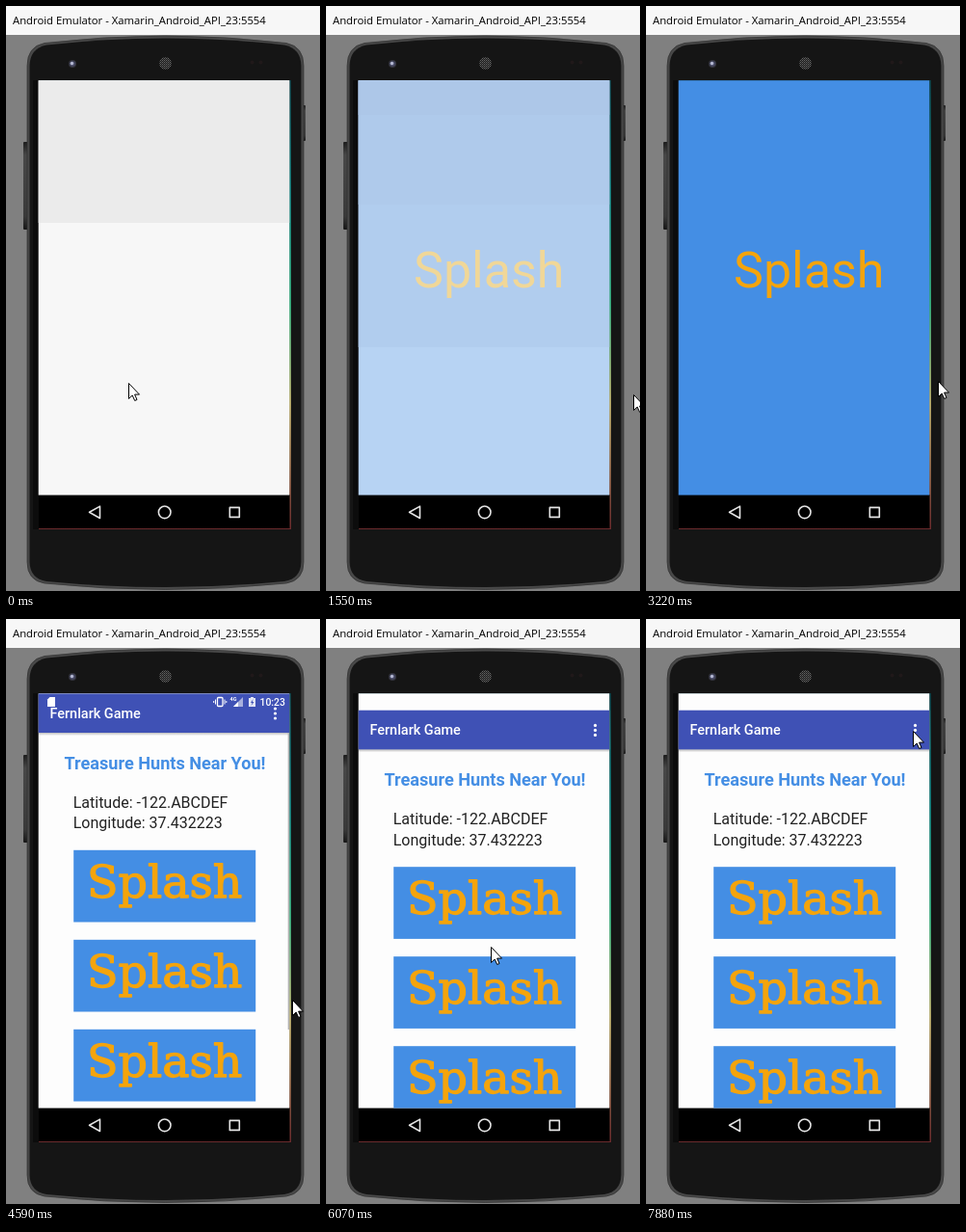
An HTML page for the animation above (8000 ms loop, 326 by 607 pixels).

```html
<!DOCTYPE html>
<html lang="en">
<head>
<meta charset="utf-8">
<title>Emulator demo</title>
<style>
  html, body { margin: 0; width: 100%; height: 100%; overflow: hidden; background: #808080; }
  svg { display: block; width: 326px; height: 607px; }
  text { font-family: Roboto, Arial, sans-serif; }
  .caption { font: 11.3px "Open Sans", "Noto Sans", sans-serif; }
  .slab { font: 47.5px "DejaVu Serif", "Noto Serif", serif; }
</style>
</head>
<body>
<svg viewBox="0 0 326 607" xmlns="http://www.w3.org/2000/svg">
  <defs>
    <linearGradient id="edge" x1="0" y1="0" x2="0" y2="1">
      <stop offset="0" stop-color="#0c3c42"/>
      <stop offset=".25" stop-color="#127a78"/>
      <stop offset=".5" stop-color="#35a878"/>
      <stop offset=".72" stop-color="#b5a868"/>
      <stop offset="1" stop-color="#6a2a2c"/>
    </linearGradient>
    <linearGradient id="shade" x1="0" y1="0" x2="0" y2="1">
      <stop offset="0" stop-opacity=".25"/>
      <stop offset="1" stop-opacity="0"/>
    </linearGradient>
    <linearGradient id="key" x1="0" y1="0" x2="0" y2="1">
      <stop offset="0" stop-color="#1c1c1c"/>
      <stop offset=".15" stop-color="#484848"/>
      <stop offset=".85" stop-color="#3a3a3a"/>
      <stop offset="1" stop-color="#161616"/>
    </linearGradient>
    <pattern id="mesh" width="2" height="2" patternUnits="userSpaceOnUse">
      <rect width="2" height="2" fill="#191919"/>
      <rect width="1" height="1" fill="#686868"/>
      <rect x="1" y="1" width="1" height="1" fill="#4c4c4c"/>
    </pattern>
    <clipPath id="display"><rect x="33.700" y="77.300" width="260.500" height="430.300"/></clipPath>
    <g id="card">
      <rect x="70.200" y="239.800" width="189" height="74.700" fill="#448ee4"/>
      <text class="slab" x="84" y="289" fill="#f4a40c" stroke="#f4a40c" stroke-width="1.300" stroke-linejoin="round">Splash</text>
    </g>
  </defs>

  <rect width="326" height="607" fill="#808080"/>
  <rect width="326" height="30" fill="#f7f7f7"/>
  <text class="caption" x="7" y="19" fill="#000">Android Emulator - Xamarin_Android_API_23:5554</text>

  <!-- phone body -->
  <rect x="18" y="141" width="5" height="91" rx="1" fill="url(#key)"/>
  <rect x="307" y="103" width="4" height="37" rx="1" fill="url(#key)"/>
  <path d="M22 62Q22 42 40 38.500Q165 23.500 291 38.500Q309 42 309 62V577Q309 596 291 599Q165 612 40 599Q22 596 22 577Z" fill="#484848" stroke="#303030" stroke-width=".7"/>
  <path d="M24.500 62Q25 44 42 40.500Q165 26.500 289 40.500Q306 44 306.500 62V577Q306 594 289 597Q165 609 42 597Q25 594 24.500 577Z" fill="#151515"/>
  <rect x="28" y="77" width="6" height="466" fill="#0c0c0c"/>
  <circle cx="69" cy="60" r="4" fill="#33343d"/>
  <circle cx="69" cy="60" r="2.800" fill="#4a4c68"/>
  <circle cx="68.500" cy="59.500" r="1.700" fill="#b4b8d2"/>
  <circle cx="165.500" cy="59.500" r="6.500" fill="url(#mesh)"/>
  <circle cx="255.500" cy="58.500" r="2" fill="#20191a"/>
  <circle cx="264.500" cy="58.500" r="2" fill="#20191a"/>

  <!-- display -->
  <rect x="34" y="77" width="262" height="466" fill="url(#edge)"/>
  <rect x="34" y="507" width="260.500" height="35" fill="#000"/>
  <g fill="none" stroke="#e4e4e4" stroke-width="1.600" stroke-linejoin="round">
    <path d="M86.500 525.300L97.500 519.100V531.500Z"/>
    <circle cx="164.700" cy="525.300" r="6.300"/>
    <rect x="232.300" y="520.400" width="10" height="10"/>
  </g>

  <g clip-path="url(#display)">
    <g id="blank">
      <rect x="33" y="77" width="262" height="431" fill="#f7f7f7"/>
      <rect x="33" y="77" width="262" height="148" fill="#ebebeb"/>
    </g>
    <g id="splash">
      <rect id="splashBack" x="33" y="77" width="262" height="431"/>
      <g id="bands">
        <rect x="33" y="77" width="262" height="277" fill="#b1cdee"/>
        <rect x="33" y="77" width="262" height="129" fill="#afcaeb"/>
        <rect x="33" y="77" width="262" height="36" fill="#adc7e8"/>
      </g>
      <text id="splashText" x="91" y="291.500" font-size="52">Splash</text>
    </g>
    <g id="app">
      <rect x="33" y="77" width="262" height="431" fill="#fdfdfd"/>
      <g id="page">
        <rect x="33" y="77.300" width="262" height="40.700" fill="#3f51b5"/>
        <rect x="33" y="118" width="262" height="3" fill="url(#shade)"/>
        <text x="45.500" y="103" font-size="14.440" font-weight="500" fill="#fff">Fernlark Game</text>
        <g fill="#fff">
          <circle cx="279.500" cy="93" r="1.600"/>
          <circle cx="279.500" cy="98" r="1.600"/>
          <circle cx="279.500" cy="103" r="1.600"/>
        </g>
        <text x="165" y="155.500" font-size="18.100" font-weight="700" text-anchor="middle" fill="#448ee4">Treasure Hunts Near You!</text>
        <g font-size="16" fill="#222">
          <text x="69.700" y="196">Latitude: -122.ABCDEF</text>
          <text x="69.700" y="217.300">Longitude: 37.432223</text>
        </g>
        <use href="#card"/>
        <use href="#card" y="93"/>
        <use href="#card" y="186"/>
      </g>
      <rect id="scrollbar" x="292.700" y="118" width="2" height="308" fill="#b4b4b4"/>
      <g id="status" fill="#fff">
        <path d="M45.500 81H51V91H43V83.500Z"/>
        <rect x="219.500" y="81.500" width="5.500" height="9" rx="1" fill="none" stroke="#fff" stroke-width="1.300"/>
        <path d="M217.500 83.500V88.500M227 83.500V88.500M215.700 85V87M228.800 85V87" stroke="#fff"/>
        <text x="232.500" y="85" font-size="5.500" font-weight="700">4G</text>
        <path d="M246 81V91H236Z" opacity=".55"/>
        <path d="M241 86V91H236Z"/>
        <path d="M254 81H257V82H259V91H252V82H254Z" opacity=".85"/>
        <path d="M256.500 83L254 87H255.500L254.500 90L257.500 86H255.800Z" fill="#3f51b5"/>
        <text x="263.500" y="90" font-size="10.400" font-weight="500">10:23</text>
      </g>
      <circle id="press" cx="278.500" cy="116.500" r="10.500" fill="#fff" opacity=".2"/>
    </g>
  </g>

  <path id="cursor" d="M.5 .5V16.500L4.200 13L6.700 18.500L9 17.500L6.600 12.100H11.500Z" fill="#fff" stroke="#000" stroke-width="1"/>
</svg>

<script>
const LOOP = 8000;
const OFF = [340, 403];

// Pointer stops: time, x, y.
const stops = [
  [0, 127, 391], [840, 143, 391], [990, 255, 391], [1120, ...OFF],
  [1400, 322, 402], [1550, 319, 403], [1820, 315, 401], [1950, 311, 399],
  [3220, 303, 389], [4590, 297, 395], [4740, 294, 404],
  [5010, 289, 403], [5140, 282, 401], [5290, 270, 376],
  [5430, 245, 402], [5550, 218, 431], [5830, 202, 447], [5950, 184, 396], [6070, 171, 340],
  [6220, 195, 276], [6340, 238, 184], [6460, 270, 106],
  [6610, 275, 111], [6730, 277, 114], [6880, 277, 115], [7880, 277, 116]
];

// Splash fade: time, background, text colour.
const fade = [
  [1550, '#b7d3f3', '#f0d798'],
  [1680, '#5295e7', '#f1ac1d'],
  [1820, '#448ee4', '#f4a40c']
];

const el = id => document.getElementById(id);
const latest = (list, t) => list.reduce((found, item) => item[0] <= t ? item : found, list[0]);
const show = (id, on) => el(id).setAttribute('display', on ? 'inline' : 'none');
const within = (t, from, to) => t >= from && t < to;

function draw(t) {
  const [, x, y] = latest(stops, t);
  el('cursor').setAttribute('transform', `translate(${x} ${y})`);

  const [, back, ink] = latest(fade, t);
  el('splashBack').setAttribute('fill', back);
  el('splashText').setAttribute('fill', ink);

  show('blank', t < 1550);
  show('splash', within(t, 1550, 4590));
  show('bands', t < 1680);
  show('app', t >= 4590);

  const immersive = t >= 5010;
  el('page').setAttribute('transform', `translate(0 ${immersive ? 17.4 : 0})`);
  show('status', !immersive);
  show('scrollbar', t < 5140);
  el('scrollbar').setAttribute('opacity', immersive ? 0.5 : 1);
  show('press', within(t, 6880, 7030));
}

const start = performance.now();
function tick() {
  draw((performance.now() - start) % LOOP);
  requestAnimationFrame(tick);
}
tick();
</script>
</body>
</html>
```
